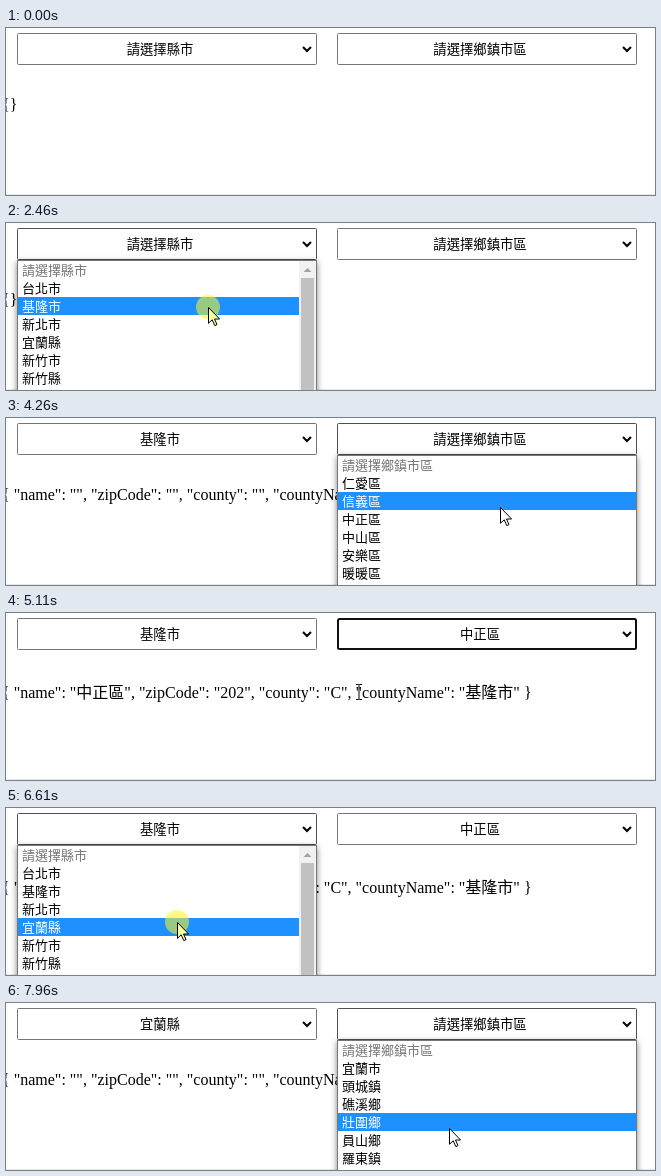
An HTML page for the animation above (8000 ms loop, 649x167 px).

```html
<!DOCTYPE html>
<html lang="zh-Hant">
<head>
<meta charset="utf-8">
<title>縣市選單</title>
<style>
  html, body { margin: 0; width: 100%; height: 100%; overflow: hidden; background: #fff; }
  svg { display: block; }
  .ui { font: 300 13.333px "Noto Sans CJK TC", "Noto Sans CJK", sans-serif; }
  .row { font-size: 13px; }
  .json { font: 16px "Liberation Serif", "Noto Sans CJK TC", serif; }
  .popup { filter: drop-shadow(0 2px 3px rgba(0, 0, 0, .5)); }
</style>
</head>
<body>
<svg id="stage" width="649" height="167" viewBox="0 0 649 167"></svg>
<script>
const LOOP = 8000, ROW = 18, LIST_TOP = 38;
const stage = document.getElementById('stage');
const ANY_COUNTY = '請選擇縣市', ANY_TOWN = '請選擇鄉鎮市區';
const COUNTIES = [ANY_COUNTY, '台北市', '基隆市', '新北市', '宜蘭縣', '新竹市', '新竹縣'];
const KEELUNG = [ANY_TOWN, '仁愛區', '信義區', '中正區', '中山區', '安樂區', '暖暖區'];
const YILAN = [ANY_TOWN, '宜蘭市', '頭城鎮', '礁溪鄉', '壯圍鄉', '員山鄉', '羅東鎮'];

// Pointer moves: start, end, steps, x, y
const MOVES = [
  [420, 420, 1, 457, 93], [498, 890, 6, 227, 23], [1520, 1760, 4, 202, 84],
  [2990, 3470, 7, 504, 26], [3950, 4410, 7, 493, 98], [5110, 5110, 1, 353, 79],
  [5170, 5490, 5, 205, 7], [5900, 6440, 8, 171, 114], [6840, 7330, 7, 470, 22],
  [7790, 7960, 3, 443, 125]
];
const PRESSES = [[1190, 1350], [2460, 2610], [3550, 3800], [4560, 4710],
  [5570, 5730], [6610, 6760], [7470, 7630]];
// Open lists: start, end, x, items, selected row, has scrollbar
const LISTS = [
  [1270, 2610, 11, COUNTIES, 0, true], [3630, 4710, 331, KEELUNG, 0, false],
  [5650, 6760, 11, COUNTIES, 2, true], [7550, LOOP, 331, YILAN, 0, false]
];
// Focus rings: start, end, x
const RINGS = [[2610, 3550, 11], [4710, 5570, 331], [6760, 7470, 11]];

const active = (spans, t) => spans.find(([a, b]) => t >= a && t < b);
const ease = u => u * (2 - u) * .6 + u * u * (3 - 2 * u) * .4;

function pointer(t) {
  let x = 480, y = 100;
  for (const [a, b, n, tx, ty] of MOVES) {
    if (t < a) break;
    const step = b > a ? Math.floor((t - a) / (b - a) * (n - 1) + 1e-6) : 0;
    const u = ease(Math.min(1, (step + 1) / n));
    x += (tx - x) * u;
    y += (ty - y) * u;
  }
  return { x: Math.round(x), y: Math.round(y) };
}

const rect = (x, y, w, h, fill, more = '') =>
  `<rect x="${x}" y="${y}" width="${w}" height="${h}" fill="${fill}" ${more}/>`;
const label = (x, y, s, fill, kind = '', more = '') =>
  `<text class="ui ${kind}" x="${x}" y="${y}" fill="${fill}" ${more}>${s}</text>`;

function jsonText(t) {
  if (t < 2610) return '{}';
  const filled = t >= 4710 && t < 6760;
  const [name, zip, code, county] = filled ? ['中正區', '202', 'C', '基隆市'] : ['', '', '', ''];
  return `{ "name": "${name}", "zipCode": "${zip}", "county": "${code}", "countyName": "${county}" }`;
}

function select(x, text, ring, hover, press) {
  const edge = press ? '#8d8d8d' : hover ? '#4f4f4f' : '#767676';
  const box = ring
    ? rect(x + 1, 6, 298, 30, '#fff', 'rx="1.5" stroke="#101010" stroke-width="2"')
    : rect(x + .5, 5.5, 299, 31, '#fff', `rx="1" stroke="${edge}"`);
  return box + label(x + 143, 26, text, '#000', '', 'text-anchor="middle"') +
    `<path d="M${x + 286} 19l4 4 4-4" fill="none" stroke="#000" stroke-width="2"/>`;
}

function popup([, , x, items, selected, bar], p) {
  const over = Math.floor((p.y - LIST_TOP) / ROW);
  const lit = over > 0 ? over : selected;
  const width = bar ? 281 : 298;
  let out = `<g class="popup">${rect(x + .5, 37.5, 299, 150, '#fff', 'stroke="#767676"')}</g>`;
  items.forEach((item, i) => {
    const y = LIST_TOP + i * ROW, on = i === lit;
    if (on) out += rect(x + 1, y, width, ROW, i ? '#1e90ff' : '#c8c8c8');
    out += label(x + 5, y + 14, item, i ? (on ? '#fff' : '#000') : '#757575', 'row');
  });
  if (bar) {
    out += rect(x + 282, LIST_TOP, 17, 140, '#f1f1f1') + rect(x + 284, 55, 13, 120, '#c1c1c1') +
      `<path d="M${x + 286.5} 49l4-4 4 4z" fill="#a3a3a3"/>`;
  }
  return out;
}

function cursor(p, beam, press) {
  const shape = beam
    ? '<path d="M-3-7.5h2.5l.5.5.5-.5H3M0-7V7M-3 7.5h2.5L0 7l.5.5H3" fill="none" stroke="#000"/>'
    : `<path d="M.5.5v15.8l3.7-3.5 2.6 5.8 2.2-1-2.5-5.6h5.1z" fill="${press ? '#ffffa0' : '#fff'}" stroke="#000"/>`;
  return `<g transform="translate(${p.x} ${p.y})">${shape}</g>`;
}

function scene(t) {
  const p = pointer(t), list = active(LISTS, t), ring = active(RINGS, t), press = active(PRESSES, t);
  const shown = t >= 420, json = jsonText(t), tall = json.includes('基');
  const base = tall ? 85 : 82;
  const county = t < 2610 ? ANY_COUNTY : t < 6760 ? '基隆市' : '宜蘭縣';
  const town = t >= 4710 && t < 6760 ? '中正區' : ANY_TOWN;
  const box = (x, text) => {
    const inside = shown && p.x >= x && p.x < x + 300 && p.y >= 5 && p.y < 37;
    return select(x, text, ring && ring[2] === x, inside || (list && list[2] === x), inside && press);
  };
  const textEnd = json.length < 3 ? 11 : tall ? 525 : 394;
  const beam = !list && t >= 2990 && p.x < textEnd && p.y > base - 14 && p.y < base + 5;

  let out = rect(0, 166, 649, 1, '#e8e8e8') + box(11, county) + box(331, town) +
    `<text class="json" x="-4" y="${base}">${json}</text>`;
  if (list) out += popup(list, p);
  if (press) out += `<circle cx="${p.x}" cy="${p.y}" r="12" fill="#fff81c" fill-opacity=".55"/>`;
  if (shown) out += cursor(p, beam, press);
  return out;
}

let last = '';
function draw(now) {
  const next = scene(now % LOOP);
  if (next !== last) stage.innerHTML = last = next;
}

let start = null;
function tick(now) {
  if (start === null) start = now;
  draw(now - start);
  requestAnimationFrame(tick);
}
draw(0);
requestAnimationFrame(tick);
</script>
</body>
</html>
```
